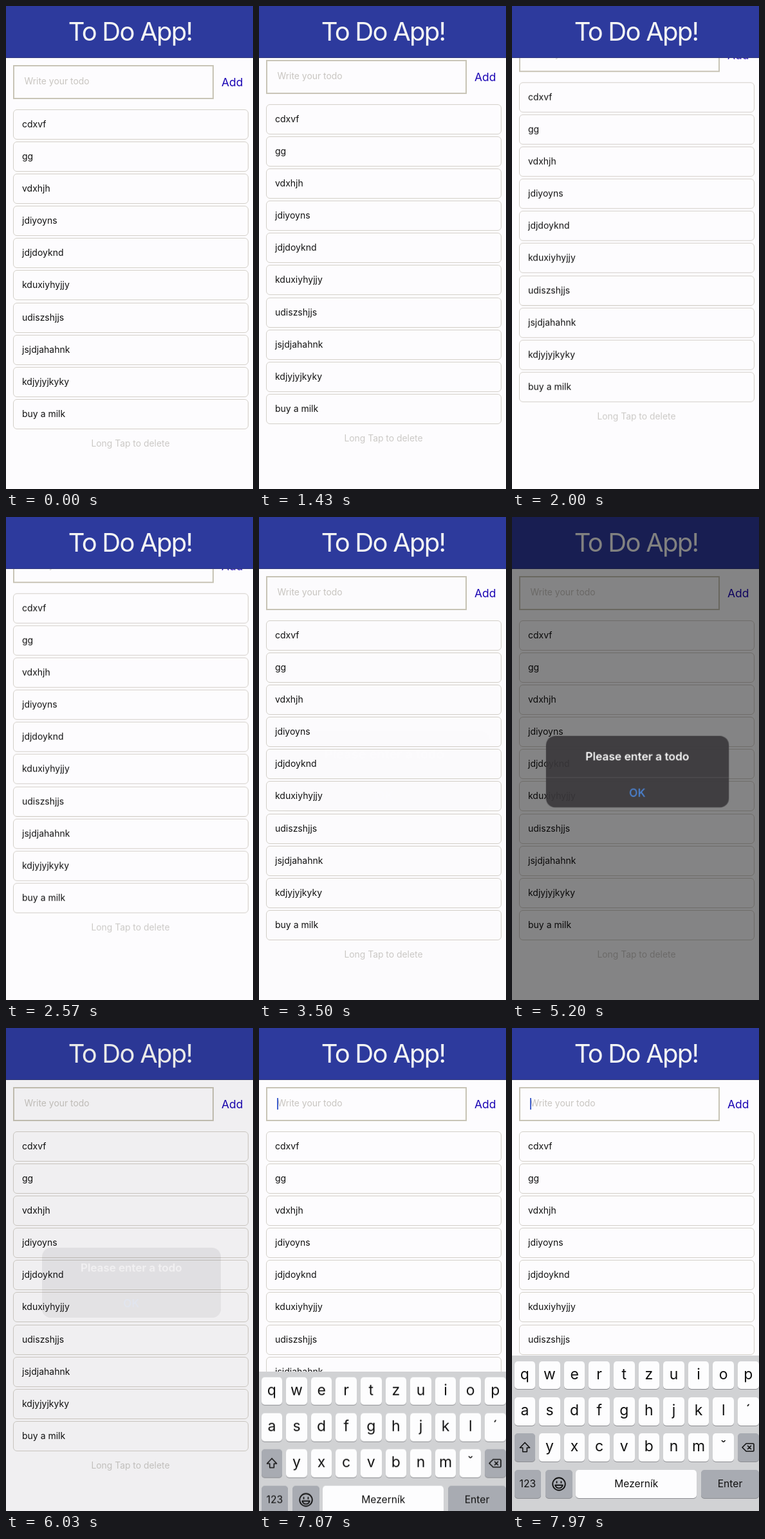
Animation, 384 px wide and 752 px high, one loop 8000 ms. Source, as an HTML page:

```html
<!DOCTYPE html>
<html lang="cs">
<head>
<meta charset="utf-8">
<title>To Do App!</title>
<style>
  html, body { margin: 0; width: 100%; height: 100%; overflow: hidden; }
  body { position: relative; background: #fdfcfe; font: 14px Inter, sans-serif; color: #111; }
  body * { position: absolute; box-sizing: border-box; white-space: nowrap; }
  .content, .dim, .alert, .press, .keyboard, .caret { animation: 8s linear infinite; }

  .header {
    left: 0; top: 0; width: 100%; height: 81px; padding-left: 2px; line-height: 79px;
    border-bottom: 1px solid #30387a; background: #2d3a9d; color: #f6f6f4;
    font-size: 40px; letter-spacing: -1.75px; text-align: center;
  }
  .content { left: 0; top: 0; width: 384px; height: 752px; animation-name: scroll; }
  .input {
    left: 10.5px; top: 92px; width: 312px; height: 53px; padding-left: 16px;
    border: 2.5px solid #c8c4b6; line-height: 47px; font-size: 13.9px; color: #c8c5c0;
  }
  .caret { left: 28px; top: 109px; width: 2px; height: 18px; background: #4260cd; animation-name: caret; }
  .add { left: 335px; top: 106px; line-height: 25px; font-size: 17.5px; color: #1a05b4; }
  .item {
    left: 10.5px; width: 366.5px; height: 47px; padding-left: 13.5px;
    border: 1.3px solid #d3cfc8; border-radius: 6px; line-height: 44.5px;
  }
  .hint {
    left: 0; top: 671px; width: 387px; line-height: 20px;
    text-align: center; font-size: 13.9px; color: #cbc9c6;
  }

  .dim { inset: 0; background: #000; animation-name: dim; }
  .alert {
    left: 55.5px; top: 341.5px; width: 277.5px; height: 108.5px; border-radius: 14px;
    overflow: hidden; background: rgba(58, 56, 59, .95); text-align: center;
    animation-name: alert;
  }
  .alert div { left: 0; width: 100%; }
  .message { top: 0; line-height: 63px; font-size: 17px; font-weight: 600; color: #fff; }
  .alert .press { top: 63px; height: 46px; background: #5d5a60; animation-name: press; }
  .ok { top: 63px; height: 46px; line-height: 46px; border-top: 1px solid #535155; font-size: 17px; font-weight: 500; color: #4a88e0; }

  .keyboard { left: 0; top: 510px; width: 384px; height: 242px; background: #d1d2d4; animation-name: keyboard; }
  .key {
    height: 43.5px; line-height: 41px; border-radius: 5px; background: #fdfdfe;
    box-shadow: 0 1px 0 #8c8d91; text-align: center; font-size: 23px;
  }
  .key.grey { background: #a8abb2; }
  .key.small { font-size: 15.6px; line-height: 43px; }
  .key svg { left: 50%; top: 50%; transform: translate(-50%, -50%); fill: none; stroke: #111; stroke-width: 1.6; stroke-linejoin: round; stroke-linecap: round; }

  @keyframes scroll {
    0%, 16.5% { transform: translateY(0); animation-timing-function: ease-in; }
    17.875% { transform: translateY(-8px); animation-timing-function: ease-out; }
    25%, 32.125% { transform: translateY(-42.3px); animation-timing-function: cubic-bezier(.3, 0, .2, 1); }
    38.5%, 100% { transform: translateY(0); }
  }
  @keyframes dim {
    0%, 43.75% { opacity: 0; }
    46%, 53.6% { opacity: .48; }
    56.75%, 63.375% { opacity: 0; }
    65%, 72.9% { opacity: .48; }
    75.375% { opacity: .05; }
    77%, 100% { opacity: 0; }
  }
  @keyframes alert {
    0%, 43.75% { opacity: 0; transform: scale(1.18); }
    45.375% { opacity: .96; transform: scale(1.023); }
    47.5%, 53.6% { opacity: 1; transform: none; }
    56.75% { opacity: 0; transform: none; }
    56.76%, 63.375% { opacity: 0; transform: scale(1.18); }
    65% { opacity: .96; transform: scale(1.023); }
    67%, 72.9% { opacity: 1; transform: none; }
    75.375% { opacity: .09; transform: none; }
    76.25%, 100% { opacity: 0; transform: none; }
  }
  @keyframes press {
    0%, 51.5% { opacity: 0; }
    52%, 56.75% { opacity: 1; }
    56.76%, 71.4% { opacity: 0; }
    72%, 77% { opacity: 1; }
    77.01%, 100% { opacity: 0; }
  }
  @keyframes keyboard {
    0%, 86% { transform: translateY(244px); animation-timing-function: cubic-bezier(.2, .7, .2, 1); }
    91.5%, 100% { transform: none; }
  }
  @keyframes caret {
    0%, 86.4% { opacity: 0; }
    86.5%, 100% { opacity: 1; }
  }
</style>
</head>
<body>
<div class="content">
  <div class="input">Write your todo</div>
  <div class="caret"></div>
  <div class="add">Add</div>
  <div class="hint">Long Tap to delete</div>
</div>
<div class="header">To Do App!</div>
<div class="dim"></div>
<div class="alert">
  <div class="press"></div>
  <div class="message">Please enter a todo</div>
  <div class="ok">OK</div>
</div>
<div class="keyboard"></div>
<script>
  const content = document.querySelector('.content');
  const keyboard = document.querySelector('.keyboard');

  function add(parent, className, html, style) {
    const node = document.createElement('div');
    node.className = className;
    node.innerHTML = html;
    for (const name in style) node.style[name] = style[name] + 'px';
    parent.append(node);
  }

  const todos = 'cdxvf,gg,vdxhjh,jdiyoyns,jdjdoyknd,kduxiyhyjjy,udiszshjjs,jsjdjahahnk,kdjyjyjkyky,buy a milk';
  todos.split(',').forEach((todo, i) => add(content, 'item', todo, { top: 160.8 + i * 50.13 }));

  const icon = (size, shapes) => `<svg width="${size}" height="${size}" viewBox="0 0 20 20">${shapes}</svg>`;
  const shift = icon(19, '<path d="M10 2 18 10.5H13.5V17H6.5V10.5H2Z"/>');
  const erase = icon(20, '<path d="M7 4H17.5Q19 4 19 5.5V14.5Q19 16 17.5 16H7L1 10ZM9.5 7.5l5 5m0-5-5 5"/>');
  const smile = icon(23, '<circle cx="10" cy="10" r="8.5"/><path d="M7 6.7v1.6M13 6.7v1.6M5 11.5H15Q14 15.5 10 15.5T5 11.5Z"/>');

  const key = (label, left, top, width, kind = '') =>
    add(keyboard, 'key ' + kind, label, { left, top, width });

  ['qwertzuiop', 'asdfghjkl´', ' yxcvbnmˇ '].forEach((row, r) => {
    [...row].forEach((letter, i) => {
      if (letter !== ' ') key(letter, 3.6 + i * 38.6, 8.7 + r * 56.3, 32.6);
    });
  });
  key(shift, 3.6, 121.3, 32.6, 'grey');
  key(erase, 351, 121.3, 32.6, 'grey');
  key('123', 3.6, 178, 41.5, 'grey small');
  key(smile, 51.5, 178, 42, 'grey small');
  key('Mezerník', 99.3, 178, 188, 'small');
  key('Enter', 294, 178, 90, 'grey small');
</script>
</body>
</html>
```
